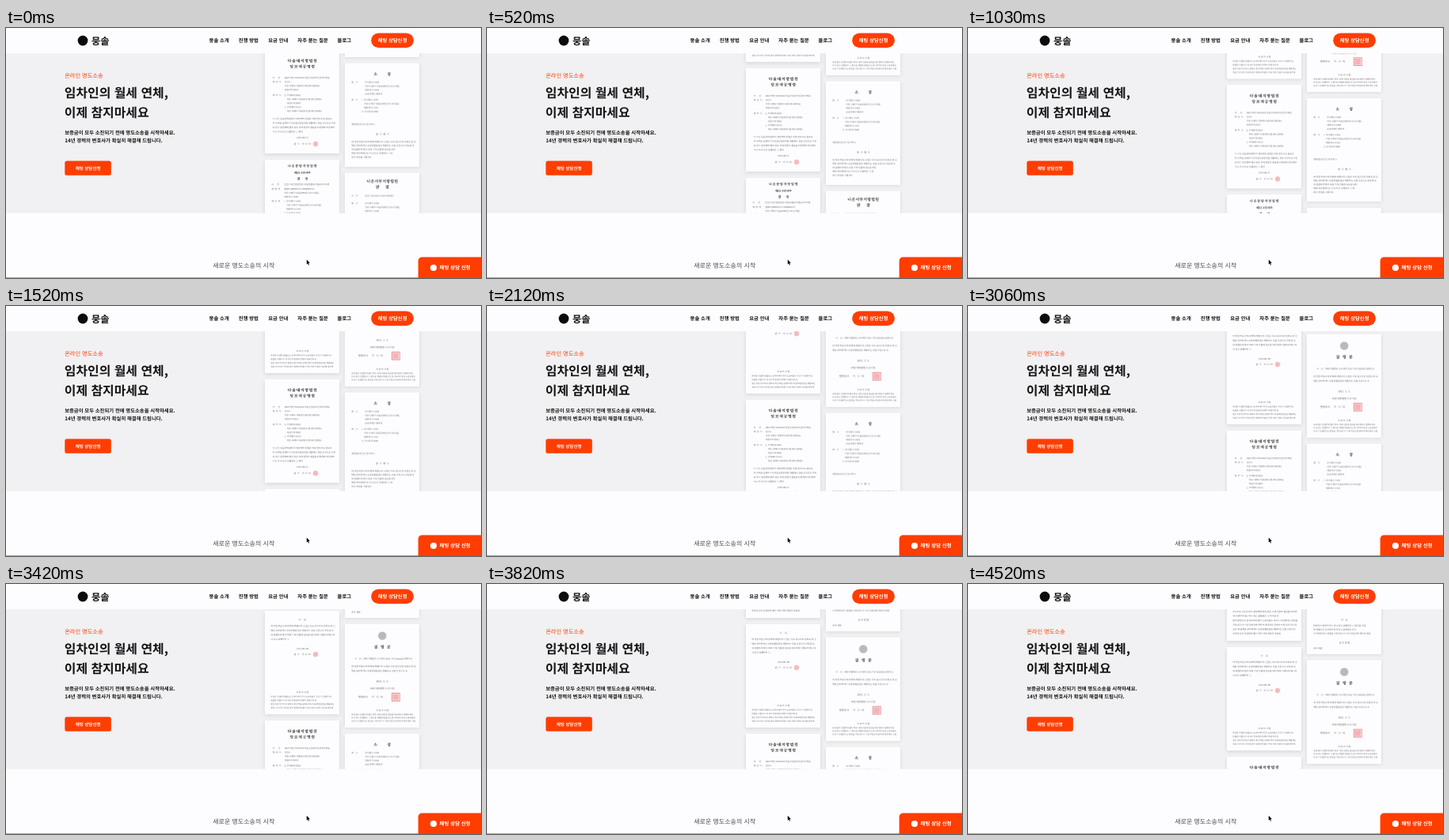
Animation, 600 px wide and 317 px high, one loop 4.56 s. Source, as an HTML page with a canvas:

```html
<!DOCTYPE html>
<html lang="ko">
<head>
<meta charset="utf-8">
<title>온라인 명도소송</title>
<style>
  html, body { margin: 0; width: 100%; height: 100%; overflow: hidden; background: rgb(253, 252, 254); }
  canvas { display: block; width: 100%; height: 100%; }
</style>
</head>
<body>
<canvas id="stage" width="600" height="317"></canvas>
<script>
const LOOP = 4560;
const CARD_W = 93.5, CARD_H = 131, PITCH = 139, DETAIL = 4;
const LEFT_X = 327.3, RIGHT_X = 428.3, RIGHT_SHIFT = 16.5;
const HEADER_H = 32, HERO_END = 234.7;
const PAPER = 'rgb(253,252,254)', GREY = 'rgb(241,240,242)', ORANGE = 'rgb(255,61,0)';
const INK = '#141414', PRINT = '#3a3a3e', WHITE = 'white';
const SANS = '"Noto Sans CJK KR", "Noto Sans CJK", sans-serif';
const SERIF = '"Noto Serif CJK KR", "Noto Sans CJK KR", "Noto Sans CJK", serif';

// pairs of milliseconds and scroll offset
const SCROLL = [[0, 28], [520, 51], [1520, 93], [2120, 119], [3060, 158], [3820, 190], [4520, 219], [4560, 220.7]];

const ctx = document.getElementById('stage').getContext('2d');

function write(c, str, x, y, size, { bold = false, color = INK, align = 'left', gap = 0, family = SANS } = {}) {
  c.font = `${bold ? 700 : 400} ${size}px ${family}`;
  c.textRendering = 'geometricPrecision';
  c.letterSpacing = gap + 'px';
  c.textAlign = align;
  c.fillStyle = color;
  c.fillText(str, x, y + size * 0.38);
}

function box(c, x, y, w, h, radius, color) {
  c.fillStyle = color;
  c.beginPath();
  c.roundRect(x, y, w, h, radius);
  c.fill();
}

function disc(c, x, y, r, color) {
  c.fillStyle = color;
  c.beginPath();
  c.arc(x, y, r, 0, Math.PI * 2);
  c.fill();
}

const FILLER = '이 사건 부동산에 관하여 채권자의 신청은 이유 있으므로 담보로 위 금액을 공탁하거나 ' +
  '보증보험증권을 제출하는 것을 조건으로 주문과 같이 결정하며 별지 목록 기재 건물의 점유를 ' +
  '타인에게 이전하여서는 아니 되고 집행관은 그 취지를 적당한 방법으로 공시하여야 한다 ' +
  '소송비용은 피고가 부담한다는 판결을 구합니다 ';

function makeCard(draw) {
  const canvas = document.createElement('canvas');
  canvas.width = CARD_W * DETAIL;
  canvas.height = CARD_H * DETAIL;
  const c = canvas.getContext('2d');
  c.scale(DETAIL, DETAIL);
  c.fillStyle = PAPER;
  c.fillRect(0, 0, CARD_W, CARD_H);
  let cursor = 0;

  const pen = {
    c,
    title: (str, y, size = 4.8, gap = 0.75) =>
      write(c, str, 47 + gap / 2, y, size, { bold: true, align: 'center', gap, family: SERIF }),
    middle: (str, y, size = 2.9) =>
      write(c, str, 47, y, size, { color: PRINT, align: 'center', family: SERIF }),
    line: (str, x, y, size = 2.75) => write(c, str, x, y, size, { color: PRINT, family: SERIF }),
    rows: (x, y, step, lines) => lines.forEach((str, i) => pen.line(str, x, y + i * step)),
    // running text cut to the measure of each line
    para(x, y, step, widths, size = 2.75) {
      c.font = `400 ${size}px ${SERIF}`;
      c.letterSpacing = '0px';
      widths.forEach((width, i) => {
        let str = '';
        while (c.measureText(str).width < width) str += FILLER[cursor++ % FILLER.length];
        pen.line(str.trim(), x, y + i * step, size);
      });
    },
    seal(y) {
      pen.middle('판  사    가  나  다', y);
      disc(c, 63.7, y, 3.3, 'rgba(238,120,125,.5)');
    },
  };
  draw(pen);
  return canvas;
}

const CASE = '2022 카단 XXXXXX 부동산점유이전금지가처분';
const ADDRESS = '가온 나래구 다솜로OO길 OO (OO동)';
const COMPANY = '주식회사 OOO';
const CHIEF = '대표이사 OOO';
const PARTY = ['1. ' + COMPANY, '    ' + ADDRESS, '    ' + CHIEF, '2. ' + COMPANY];

const reasons = makeCard(p => {
  p.middle('신  청  이  유', 12);
  p.para(7, 22, 5.6, [80, 78, 80, 46]);
  p.para(7, 55, 5.6, [79, 80, 60]);
  p.para(7, 94, 5.55, [80, 58, 80, 80, 79, 62]);
});

const ruling = makeCard(p => {
  p.middle('이    유', 11, 3.2);
  p.para(7, 19, 5.6, [79, 78, 80, 21]);
  p.middle('2022.06.20', 48);
  p.seal(55);
  p.middle('※ 유 의 사 항', 103, 2.7);
  p.para(7, 108.5, 4.8, [78, 56, 80, 77], 2.5);
});

const order = makeCard(p => {
  p.title('다솔내지방법원', 13.5);
  p.title('담보제공명령', 20.7);
  p.line('사      건', 9.5, 35);
  p.line(CASE, 24.5, 35);
  p.line('채  권  자', 9.5, 40.3);
  p.rows(24.5, 40.3, 5, ['김OO', ADDRESS, CHIEF]);
  p.line('채  무  자', 9.5, 57.2);
  p.rows(24.5, 57.2, 5, [...PARTY, '    ' + ADDRESS]);
  p.para(9.5, 87, 5.5, [75, 77, 77, 36]);
  p.middle('2022.06.21', 111);
  p.seal(119);
});

const decision = makeCard(p => {
  p.title('나온중앙지방법원', 7.7, 4, 0.8);
  p.title('제52-1민사부', 16.3, 3.6, 0);
  p.title('결      정', 24, 4, 0);
  p.line('사      건', 8, 31.3);
  p.line(CASE, 24, 31.3);
  p.line('채  권  자', 8, 37);
  p.rows(24, 37, 5, ['김OO (OOOOOO-OOOOOOO)', ADDRESS, CHIEF]);
  p.line('채  무  자', 8, 52.5);
  p.rows(24, 52.5, 5, PARTY);
});

const purport = makeCard(p => {
  p.para(8, 30, 5.4, [79, 80, 50]);
  p.middle('처    분', 88);
  p.para(8, 95.2, 5, [66, 52, 70]);
  p.middle('입 증 방 법', 117);
  p.line('추후 제출', 8, 124);
});

const writ = makeCard(p => {
  disc(p.c, 47, 15, 5.2, '#b9b9bd');
  p.title('집  행  문', 29, 4.8, 0.4);
  p.line('사    건 :  하람지방법원 누리지원 2022 가단 XXXXX 건물인도', 12, 44);
  p.para(8, 53.7, 5.8, [79, 68]);
  p.middle('2022.  2.  3.', 72.7);
  p.middle('하람지방법원 누리지원', 81.8, 3.1);
  p.line('법원주사      가   나   다', 16.5, 92.4, 3.2);
  p.c.strokeStyle = 'rgba(226,70,75,.75)';
  p.c.lineWidth = 0.8;
  p.c.strokeRect(59.3, 87.8, 9.6, 9.8);
  p.c.fillStyle = 'rgba(232,90,95,.45)';
  p.c.fillRect(60.3, 88.8, 7.6, 7.8);
  p.middle('※ 유 의 사 항', 109.5, 2.7);
  p.para(8, 114.8, 4.1, [78, 80, 79], 2.5);
});

const complaint = makeCard(p => {
  p.title('소      장', 13.7);
  p.line('원    고', 8, 24.2);
  p.rows(25, 24.2, 4.9, [COMPANY, ADDRESS, CHIEF, '소송대리인 변호사']);
  p.line('피    고', 8, 46.5);
  p.rows(21, 46.5, 5, PARTY);
  p.line('건물명도(인도) 청구의 소', 8, 77.5);
  p.middle('청  구  취  지', 90, 3.1);
  p.para(8, 99.6, 4.9, [80, 79, 54, 50]);
  p.line('라는 판결을 구합니다.', 8, 119.2);
});

const judgment = makeCard(p => {
  p.title('나온서부지방법원', 10.7, 4.9, 0.25);
  p.title('판      결', 17.8, 4.9, 0);
  p.line('사    건', 8, 29.3);
  p.line('2022 가단 OOOOOO 건물명도', 25, 29.3);
  p.line('원    고', 8, 38.8);
  p.rows(25, 38.8, 4.8, [COMPANY, ADDRESS, CHIEF]);
});

const LEFT = [reasons, ruling, order, decision];
const RIGHT = [purport, writ, complaint, judgment];

function scrollAt(t) {
  const next = SCROLL.findIndex(([time]) => time > t);
  const [startTime, startY] = SCROLL[next - 1], [endTime, endY] = SCROLL[next];
  return startY + (endY - startY) * (t - startTime) / (endTime - startTime);
}

function drawColumn(cards, x, top) {
  cards.forEach((card, i) => {
    const y = top + (i - 2) * PITCH;
    if (y > HERO_END || y + CARD_H < HEADER_H - 8) return;
    ctx.save();
    ctx.shadowColor = 'rgba(40,40,60,.13)';
    ctx.shadowBlur = 5;
    ctx.shadowOffsetY = 1.5;
    ctx.fillStyle = PAPER;
    ctx.fillRect(x, y, CARD_W, CARD_H);
    ctx.restore();
    ctx.drawImage(card, x, y, CARD_W, CARD_H);
  });
}

function drawHero(t) {
  ctx.fillStyle = GREY;
  ctx.fillRect(0, HEADER_H, 600, HERO_END - HEADER_H);
  ctx.save();
  ctx.beginPath();
  ctx.rect(0, HEADER_H, 600, HERO_END - HEADER_H);
  ctx.clip();
  const top = scrollAt(t);
  drawColumn(LEFT, LEFT_X, top);
  drawColumn(RIGHT, RIGHT_X, top + RIGHT_SHIFT);
  ctx.restore();

  write(ctx, '온라인 명도소송', 74.2, 60.3, 7.2, { color: ORANGE });
  write(ctx, '임차인의 월세 연체,', 73.8, 82, 15.9, { bold: true });
  write(ctx, '이제 참지마세요', 73.8, 107, 15.9, { bold: true });
  write(ctx, '보증금이 모두 소진되기 전에 명도소송을 시작하세요.', 74.2, 132.4, 6.35, { bold: true });
  write(ctx, '14년 경력의 변호사가 확실히 해결해 드립니다.', 74.2, 142.7, 6.35, { bold: true });
  box(ctx, 74.3, 168.4, 58.5, 18.4, 2.6, ORANGE);
  write(ctx, '채팅 상담신청', 103.6, 177.7, 5.5, { bold: true, color: WHITE, align: 'center' });
}

function drawHeader() {
  ctx.fillStyle = PAPER;
  ctx.fillRect(0, 0, 600, HEADER_H);
  disc(ctx, 97, 16, 6.4, '#0c0c0c');
  write(ctx, '뭉솔', 108, 16.2, 12.2, { bold: true });
  const menu = [['뭉솔 소개', 256.6], ['진행 방법', 293.8], ['요금 안내', 331.2], ['자주 묻는 질문', 368.3], ['블로그', 418.6]];
  for (const [label, x] of menu) write(ctx, label, x, 15.8, 6.35, { bold: true });
  box(ctx, 461.2, 6.5, 53.8, 18.4, 9.2, ORANGE);
  write(ctx, '채팅 상담신청', 488.1, 15.8, 6.35, { bold: true, color: WHITE, align: 'center' });
}

function drawPointer(x, y) {
  ctx.beginPath();
  [[0, 0], [0, 6], [1.3, 4.8], [2.3, 7], [3.2, 6.6], [2.3, 4.5], [4.1, 4.4]]
    .forEach(([dx, dy]) => ctx.lineTo(x + dx, y + dy));
  ctx.closePath();
  ctx.strokeStyle = WHITE;
  ctx.lineWidth = 1;
  ctx.stroke();
  ctx.fillStyle = 'black';
  ctx.fill();
}

function drawFooter() {
  write(ctx, '새로운 명도소송의 시작', 300.2, 301.2, 8, { color: '#4c4c50', align: 'center' });
  ctx.fillStyle = '#a9a8ab';
  ctx.fillRect(0, 316, 600, 1);
  box(ctx, 520.7, 290.4, 79.3, 26.6, [5, 0, 0, 0], ORANGE);
  disc(ctx, 540, 304, 4.1, WHITE);
  write(ctx, '채팅 상담 신청', 547.6, 303.8, 6.45, { bold: true, color: WHITE });
  drawPointer(379.8, 293.7);
}

function render(now) {
  ctx.imageSmoothingQuality = 'high';
  ctx.fillStyle = PAPER;
  ctx.fillRect(0, 0, 600, 317);
  drawHero(Math.max(0, now) % LOOP);
  drawHeader();
  drawFooter();
  requestAnimationFrame(render);
}
requestAnimationFrame(render);
</script>
</body>
</html>
```
